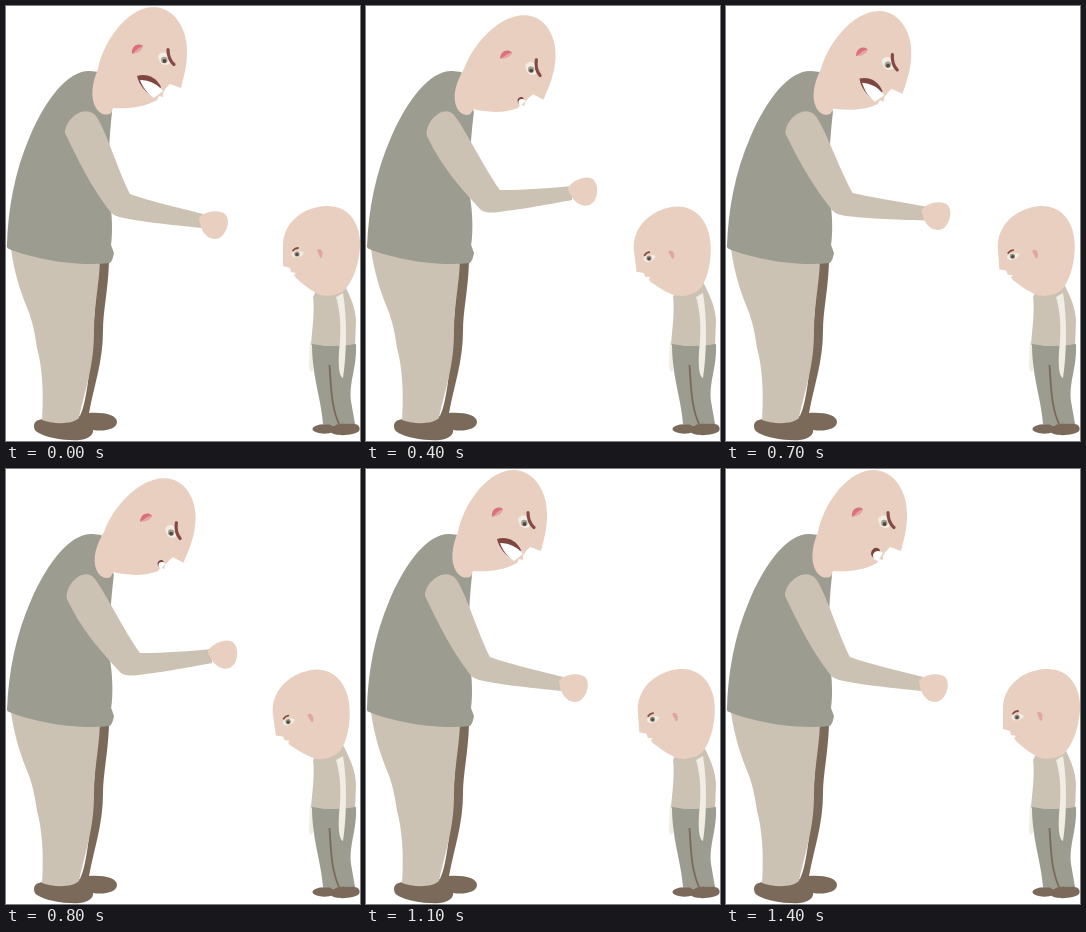
These frames come from a looping animation (354 px wide and 435 px high, 1.5 s). An HTML page:

```html
<!DOCTYPE html>
<html lang="en">
<head>
<meta charset="utf-8">
<title>Scolding</title>
<style>
  html, body { margin: 0; width: 100%; height: 100%; overflow: hidden; background: #fff; }
  svg { display: block; width: 354px; height: 435px; }
  .skin { fill: #e8cfc0; }
  .cloth { fill: #cbc2b4; }
  .grey { fill: #9c9c90; }
  .brown { fill: #7b6a5a; }
  .light { fill: #f1ede5; }
  .brow { fill: none; stroke: #874943; stroke-linecap: round; }
</style>
</head>
<body>
<svg viewBox="0 0 354 435">
  <g id="man">
    <path class="brown" d="M28 420C28 413 38 412 46 414L74 410C82 395 86 350 92 256L103 256C102 285 97 305 97 325C97 355 88 380 83 407C98 406 111 409 111 416C111 423 98 426 87 424C88 429 82 433 74 434C60 435 40 432 31 426Q28 424 28 420Z"/>
    <path class="cloth" d="M5 243L94 255C93 280 88 300 88 325C88 360 80 380 73 412C66 419 46 418 36 414C38 385 36 360 31 342C29 328 27 317 22 304C14 285 8 265 5 243Z"/>
    <path id="vest" class="grey" d="M1 238C2 205 8 167 24 130C40 93 62 64 84 65L93 66L106 106C104 125 103 140 103 150V190C106 205 107 225 105 239L108 247C107 252 106 255 104 257C70 261 28 253 3 243Q0 242 1 238Z"/>
    <g id="manHead">
      <path class="skin" d="M146 1C167 0 182 22 181 47C181 60 178 70 175 82L164 78Q160 81 157 87L157 91L153 90L151 94C139 101 123 103 107 102L105 107C101 110 94 109 90 102C84 92 86 77 92 63C96 40 118 3 146 1Z"/>
      <path fill="#d9707c" d="M126 48C125 41 131 36 137 40C137 43 129 45 126 48Z"/>
      <path fill="#e3a39f" d="M127 48Q132 41 137 40Q136 46 127 48Z"/>
      <path class="light" d="M152 50C155 45 161 45 164 52Q168 57 163 58C157 61 153 57 152 50Z"/>
      <circle cx="158.300" cy="54" r="3.200" fill="#a3a08f"/>
      <circle cx="158.500" cy="55" r="1.900" fill="#54483f"/>
      <path class="brow" stroke-width="3.200" d="M162 43.500C162 51 164 55 168 58.500"/>
      <path id="mouth" fill="#7f4540"/>
      <path id="teeth" fill="#fff"/>
    </g>
    <path id="arm" class="cloth"/>
    <path id="fist" class="skin" d="M193 212C198 205 213 203 219 208C224 213 222 223 217 229C212 235 203 234 198 227C195 223 194 218 193 212Z"/>
  </g>
  <g id="boy">
    <path class="light" d="M304 335L309 340L307 365Q303 368 303 358Z"/>
    <path class="cloth" d="M310 285L337 276C344 289 350 303 350 316L349 341L305 339C306 325 309 305 307 291Z"/>
    <path class="grey" d="M306 338Q328 342 350 338C351 362 343 375 345 395L349 418Q330 422 317 418C315 392 306 370 306 338Z"/>
    <ellipse class="brown" cx="318.500" cy="423" rx="12" ry="4.700"/>
    <path class="brown" d="M324 425C326 418 335 417 344 418C352 417 355 421 353 425C348 430 326 431 324 425Z"/>
    <path fill="none" stroke="#7b6a5a" stroke-width="1.800" d="M323.500 359C325 380 325 400 333 418"/>
    <path class="light" d="M330 291L337 287C341 310 341 345 337 372C332 370 332 352 334 335C335 318 334 304 330 291Z"/>
    <g id="boyHead">
      <path class="skin" d="M320 200C342 199 355 217 354 240C353 262 344 281 336 286C330 290 318 291 312 288C302 283 296 277 290 272L288 269L290 267L285 266L284 262L277 260L277 237C279 215 298 201 320 200Z"/>
      <path fill="#dfa79d" d="M311 244C314 241 318 245 316 251Q314 253 313 249Z"/>
      <path class="light" d="M285.500 247.500Q291 242.500 298 246.500Q296 251.500 289 251.500Q285.500 251 285.500 247.500Z"/>
      <circle cx="291" cy="248" r="2.600" fill="#8f8e80"/>
      <circle cx="291" cy="248.500" r="1.500" fill="#54483f"/>
      <path class="brow" stroke-width="1.800" d="M287 244.500Q289 242 292 242"/>
    </g>
  </g>
</svg>
<script>
const el = id => document.getElementById(id);

const armLow = "M59 127C59 113 78 98 89 109C98 118 112 165 124 188C140 194 165 200 197 208L196 222C165 219 130 215 113 211C108 209 106 208 103 204C86 182 74 158 59 127Z";
const armHigh = "M61 130C58 116 78 97 88 109C97 119 118 162 134 184C160 184 185 182 206 180L206 194C180 199 150 204 133 206C124 207 117 207 113 202C95 182 76 162 61 130Z";

// Shut, half open, shouting
const mouths = [
  "M156 89C156 89 156 88 157 88L156 91C156 91 156 90 156 89Z",
  "M145 84C146 79 151 77 154 81L152 91C148 89 145 88 145 84Z",
  "M131 70C139 67 150 70 155 81L148 91C140 87 133 79 131 70Z"
];
const teeth = [
  "M156 89C156 89 156 88 157 88L156 91C156 91 156 90 156 89Z",
  "M147 86C148 81 154 81 157 84L152 92C149 91 147 90 147 86Z",
  "M134 74C144 74 151 78 157 85L148 92C142 88 137 82 134 74Z"
];

// One pose per 100 ms; 0 is head up, 1 is leaning in
const poses = {
  lean:  [0, .5, 1, 1, 1, .5, 0, .5, 1, 1, 1, 0, 0, 0, 0],
  arm:   [0, .27, 1, 1, 1, .27, 0, .27, 1, 1, 1, 0, 0, 0, 0],
  mouth: [2, 2, .6, 2, .6, 0, 1, 2, .6, 1, 2, 2, 1, 0, 1],
  boy:   [0, .5, 1, 1, .9, .42, 0, .5, 1, 1, .92, .5, .25, .1, 0]
};

function mix(a, b, t) {
  const target = b.match(/[\d.]+/g);
  let i = 0;
  return a.replace(/[\d.]+/g, n => +n + (target[i++] - n) * t);
}

function between(shapes, value) {
  const i = Math.min(Math.floor(value), shapes.length - 2);
  return mix(shapes[i], shapes[i + 1], value - i);
}

function draw(now) {
  const step = Math.floor(now % 1500 / 100);
  const [lean, arm, mouth, boy] = Object.values(poses).map(track => track[step]);
  const skew = .013 * lean;
  el("vest").setAttribute("transform", `matrix(1 0 ${-skew} 1 ${250 * skew} 0)`);
  el("manHead").setAttribute("transform", `translate(${2 * lean}) rotate(${8.6 * lean} 97 91)`);
  el("boyHead").setAttribute("transform", `translate(${-3.5 * boy}) rotate(${-8 * boy} 322 289)`);
  el("arm").setAttribute("d", mix(armLow, armHigh, arm));
  el("fist").setAttribute("transform", `translate(${10 * arm} ${-33 * arm}) rotate(${-15 * arm} 208 219)`);
  el("mouth").setAttribute("d", between(mouths, mouth));
  el("teeth").setAttribute("d", between(teeth, mouth));
}

const start = performance.now();
function tick() {
  draw(performance.now() - start);
  requestAnimationFrame(tick);
}
tick();
</script>
</body>
</html>
```
